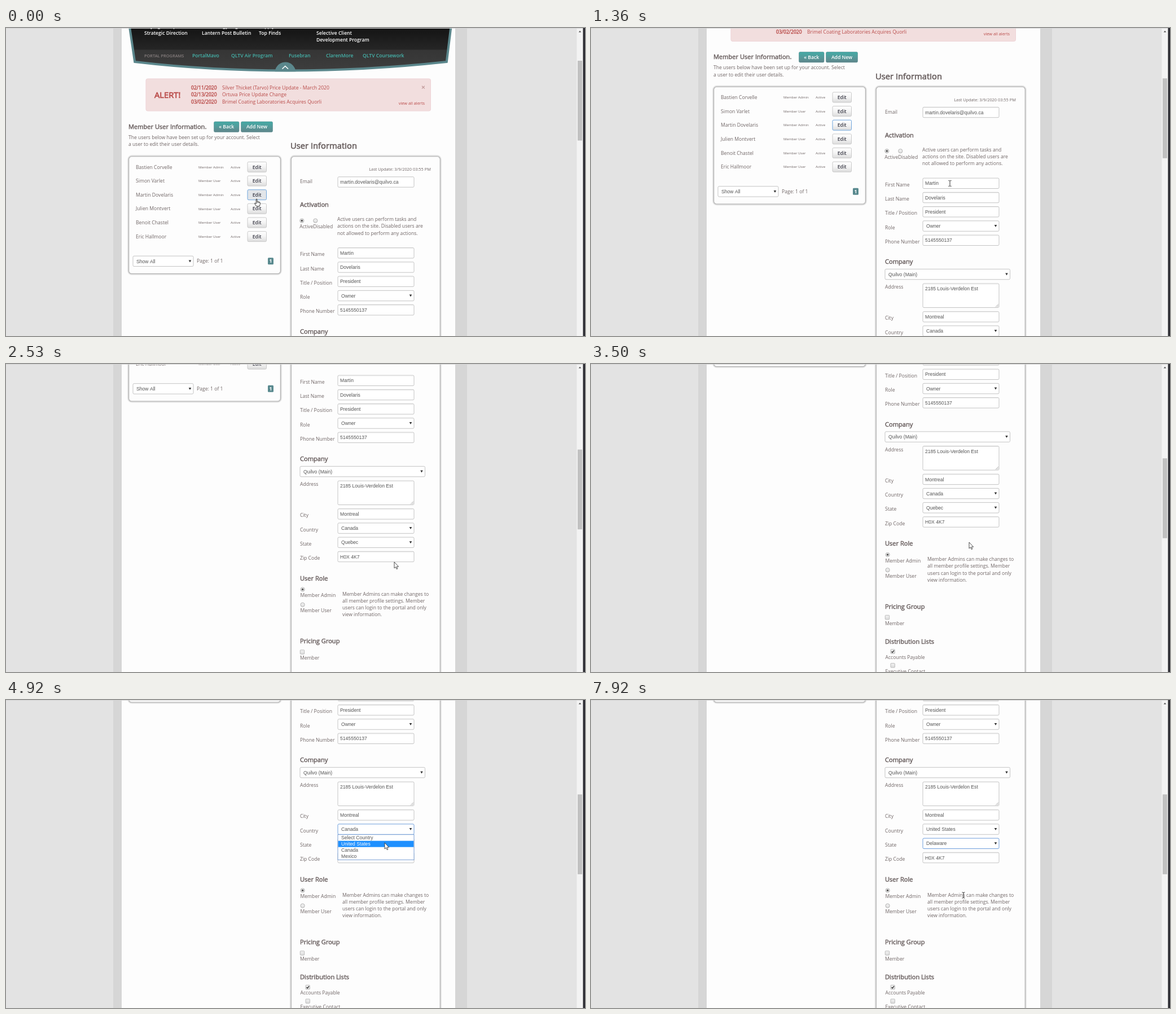
Write an HTML page with a canvas that moves like this. It is 1026 px wide and 546 px high and loops after 8 s.

```html
<!DOCTYPE html>
<html lang="en">
<head>
<meta charset="utf-8">
<title>Member user form</title>
<style>
html, body { margin: 0; width: 100%; height: 100%; overflow: hidden; background: #e3e3e3; }
canvas { display: block; width: 1026px; height: 546px; }
</style>
</head>
<body>
<canvas id="stage"></canvas>
<script>
const W = 1026, H = 546, LOOP = 8000, ZOOM = 0.616, TICK = 61.64;
const INK = '#706666', HEAD = '#685e5e', RED = '#b94a48', TEAL = '#45b5ac';
const SANS = '"Open Sans", sans-serif', ARIAL = '"Liberation Sans", Arial, sans-serif';

const canvas = document.getElementById('stage');
const c = canvas.getContext('2d');
const ratio = window.devicePixelRatio || 1;
canvas.width = W * ratio;
canvas.height = H * ratio;

// pointer path: time, x, y, shape
const path = [
  [0, 444, 303, 'hand'], [150, 540, 275, 'arrow'], [280, 640, 252, 'arrow'], [400, 706, 295, 'arrow'],
  [550, 703, 312, 'beam'], [670, 700, 324, 'beam'], [810, 682, 320, 'arrow'], [940, 662, 315, 'arrow'],
  [1080, 616, 286, 'arrow'], [1210, 575, 267, 'arrow'], [1360, 636, 275.5, 'beam'], [1520, 623, 326.5, 'beam'],
  [1670, 621, 327, 'arrow'], [1950, 645.5, 330.5, 'beam'], [2100, 689.5, 345, 'beam'], [2250, 688, 351, 'arrow'],
  [2660, 638.5, 349.5, 'beam'], [2800, 613, 317, 'arrow'], [2950, 644, 296, 'arrow'], [3080, 670, 279, 'arrow'],
  [3230, 670, 300, 'arrow'], [3360, 670, 314, 'arrow'], [3500, 670, 316, 'arrow'], [3630, 675, 270, 'arrow'],
  [3750, 677, 231, 'arrow'], [3900, 667, 206, 'beam'], [4020, 671, 228, 'arrow'], [4320, 671, 216, 'arrow'],
  [4440, 671, 208, 'arrow'], [4560, 671, 222, 'arrow'], [4680, 671, 243, 'arrow'], [4800, 671, 262, 'arrow'],
  [4920, 671, 253, 'arrow'], [6810, 670, 262, 'arrow'], [6960, 668, 300, 'arrow'], [7080, 660, 343, 'arrow'],
  [7920, 660, 346, 'beam']
];
// wheel ticks: start, duration
const wheel = [[540, 300], [675, 268], [1525, 300], [1575, 300], [2220, 300], [2270, 300], [3221, 360]];
const shots = [1820, 2400, 2530];

const people = [
  ['Bastien Corvelle', 'Member Admin'], ['Simon Varlet', 'Member User'], ['Martin Dovelaris', 'Member Admin'],
  ['Julien Montvert', 'Member User'], ['Benoit Chastel', 'Member User'], ['Eric Hallmoor', 'Member User']
];
const countries = ['Select Country', 'United States', 'Canada', 'Mexico'];
const states = ('Alabama Alaska Arizona Arkansas California Colorado Connecticut Delaware Florida Georgia ' +
  'Hawaii Idaho Illinois Indiana Iowa Kansas Kentucky Louisiana Maine Maryland').split(' ');

function text(s, x, y, { px = 14, color = INK, font = SANS, weight = 400, align = 'left', fake = false } = {}) {
  const size = px * ZOOM;
  c.font = `${weight} ${size}px ${font}`;
  c.textAlign = align;
  c.fillStyle = color;
  c.fillText(s, x, y + size * 0.36);
  if (fake) {
    c.strokeStyle = color;
    c.lineWidth = size / 24;
    c.strokeText(s, x, y + size * 0.36);
  }
}

function lines(rows, x, y, opts) {
  rows.forEach((s, i) => text(s, x, y + i * 12.32, opts));
}

function rect(x, y, w, h, fill) {
  c.fillStyle = fill;
  c.fillRect(x, y, w, h);
}

function box(x, y, w, h, r, fill, stroke, line = 1) {
  c.beginPath();
  c.roundRect(x, y, w, h, r);
  if (fill) { c.fillStyle = fill; c.fill(); }
  if (stroke) { c.strokeStyle = stroke; c.lineWidth = line; c.stroke(); }
}

function shade(y0, y1, ...stops) {
  const g = c.createLinearGradient(0, y0, 0, y1);
  stops.forEach((s, i) => g.addColorStop(i / (stops.length - 1), s));
  return g;
}

function poly(points, fill, stroke, line = 0.8) {
  c.beginPath();
  points.forEach(([x, y]) => c.lineTo(x, y));
  c.closePath();
  c.fillStyle = fill;
  c.fill();
  if (stroke) { c.strokeStyle = stroke; c.lineWidth = line; c.stroke(); }
}

const arial = (s, x, y, color = '#555') => text(s, x, y, { font: ARIAL, color });
const heading = (s, y) => text(s, 521, y, { px: 18, color: HEAD, fake: true });

function field(s, y, x = 588, w = 135, h = 18.4, mid = y) {
  box(x, mid - h / 2, w, h, 2, '#fff', '#c4c4c4');
  rect(x + 1, mid - h / 2 + 0.6, w - 2, 0.8, '#ececec');
  arial(s, x + 4, y);
}

function select(s, y, x = 588, w = 135, focus = false) {
  box(x, y - 9.2, w, 18.4, 2, '#fff', focus ? '#6f9fdc' : '#c4c4c4');
  arial(s, x + 6, y);
  const ax = x + w - 6;
  poly([[ax - 2.3, y - 2], [ax + 2.3, y - 2], [ax, y + 2]], '#333');
}

function radio(x, y, on) {
  box(x - 3.6, y - 3.6, 7.2, 7.2, 3.6, shade(y - 4, y + 4, '#f4f4f4', '#dedede'), '#999', 0.7);
  if (on) box(x - 1.8, y - 1.8, 3.6, 3.6, 1.8, '#555');
}

function check(x, y, on) {
  box(x - 3.7, y - 3.7, 7.4, 7.4, 1, shade(y - 4, y + 4, '#f2f2f2', '#dcdcdc'), '#a5a5a5', 0.7);
  if (!on) return;
  c.beginPath();
  c.moveTo(x - 2.2, y);
  c.lineTo(x - 0.6, y + 1.8);
  c.lineTo(x + 2.4, y - 2);
  c.strokeStyle = '#333';
  c.lineWidth = 1.4;
  c.stroke();
}

function panel(x, y, w, h) {
  box(x - 0.5, y - 0.5, w + 1, h + 1, 6, null, '#e2e2e2', 4);
  box(x, y, w, h, 5, '#fdfdfd', '#a9a9a9', 1.1);
}

function tealButton(s, x, w) {
  box(x, 166, w, 18.4, 2, shade(166, 184, '#43aaa5', '#549b9b', '#5f868b'), '#5a8f92', 0.6);
  text(s, x + w / 2, 175, { weight: 600, color: '#fff', align: 'center' });
}

function header() {
  c.beginPath();
  c.moveTo(213, -40);
  c.lineTo(219.3, 0);
  c.lineTo(228.2, 60);
  c.quadraticCurveTo(494, 91, 780.8, 60);
  c.lineTo(788.2, 0);
  c.lineTo(794, -40);
  c.closePath();
  c.save();
  c.clip();
  rect(205, -40, 600, 79, shade(0, 39, '#141414', '#262626'));
  rect(205, 38.5, 600, 45, shade(38, 78, '#353535', '#3e3e3e'));
  c.restore();
  c.strokeStyle = '#5b878c';
  c.lineWidth = 4;
  c.stroke();
  c.beginPath();
  c.arc(495, 79, 18.5, Math.PI * 1.03, Math.PI * 1.97);
  c.closePath();
  c.fillStyle = '#5b878c';
  c.fill();
  c.beginPath();
  c.moveTo(489.5, 72.5);
  c.lineTo(494.7, 67.5);
  c.lineTo(500, 72.5);
  c.strokeStyle = '#fff';
  c.lineWidth = 1.6;
  c.stroke();

  const nav = { weight: 600, color: '#fff' };
  [['Buying Groups', 245], ['Technology Page', 347], ['Supply List', 448]].forEach(([s, x]) => text(s, x, -3.4, nav));
  [['Strategic Direction', 245], ['Lantern Post Bulletin', 347], ['Top Finds', 448]].forEach(([s, x]) => text(s, x, 9, nav));
  lines(['Selective Client', 'Development Program'], 550, 9, nav);
  text('PORTAL PROGRAMS', 245, 49, { px: 12, weight: 600, color: '#857d7d' });
  [['PortalMavo', 330], ['QLTV Air Program', 399], ['Fusebran', 501], ['ClarenMore', 567], ['QLTV Coursework', 632]]
    .forEach(([s, x]) => text(s, x, 49, { weight: 600, color: TEAL }));
}

function alertBox() {
  box(248, 90, 504.5, 57, 3, '#f2dede', '#eed3d7');
  text('ALERT!', 263, 118.5, { px: 24, color: RED, fake: true });
  lines(['02/11/2020', '02/13/2020', '03/02/2020'], 328, 105.8, { color: RED, fake: true });
  lines(['Silver Thicket (Tarvo) Price Update - March 2020', 'Ortuva Price Update Change',
    'Brimel Coating Laboratories Acquires Quorli'], 383, 105.8, { color: RED });
  text('×', 739.5, 104.8, { px: 18, color: '#c09a9a', align: 'center', fake: true });
  text('view all alerts', 742, 133.5, { px: 12, color: RED, align: 'right' });
}

function userList(t) {
  text('Member User Information.', 217, 175, { px: 18, color: HEAD, fake: true });
  tealButton('« Back', 368.5, 44.5);
  tealButton('Add New', 416.5, 56);
  lines(['The users below have been set up for your account. Select', 'a user to edit their user details.'], 217, 193.7);
  panel(217.6, 227.8, 268.8, 207.7);
  people.forEach(([name, role], i) => {
    const y = 246.4 + i * 24.65, picked = i === 2;
    text(name, 230, y);
    text(role, 341, y, { px: 10 });
    text('Active', 398, y, { px: 10 });
    const fill = picked && t < 150 ? '#e2e5e9' : shade(y - 9, y + 9, '#fff', '#f4f4f4', '#dcdcdc');
    box(428, y - 9, 33.5, 18, 2, fill, picked ? '#6fa5dd' : '#cacaca');
    text('Edit', 444.7, y, { weight: 600, color: '#3c3c48', align: 'center' });
  });
  select('Show All', 413.4, 225, 107);
  text('Page: 1 of 1', 338, 413);
  box(464, 407.3, 10, 12, 1.5, '#5a8a8f');
  text('1', 469, 413.3, { weight: 700, color: '#fff', align: 'center' });
}

function form(t) {
  text('User Information', 504, 208.9, { px: 24, color: HEAD, fake: true });
  panel(505.3, 227.8, 264, 1000);
  text('Last Update: 3/9/2020 03:55 PM', 752.8, 250.6, { px: 12, align: 'right' });
  text('Email', 521, 272.2);
  field('martin.dovelaris@quilvo.ca', 273);
  heading('Activation', 313.5);
  radio(524.3, 341.6, true);
  radio(548.3, 341.6);
  text('Active', 520.3, 352);
  text('Disabled', 544.3, 352);
  lines(['Active users can perform tasks and', 'actions on the site. Disabled users are',
    'not allowed to perform any actions.'], 587, 339);

  const rowY = i => 398.8 + i * 25.25;
  ['First Name', 'Last Name', 'Title / Position', 'Role', 'Phone Number'].forEach((s, i) => text(s, 521, rowY(i) + 2.5));
  field('Martin', rowY(0));
  field('Dovelaris', rowY(1));
  field('President', rowY(2));
  select('Owner', rowY(3));
  field('5145550137', rowY(4));

  heading('Company', 537.8);
  select('Quilvo (Main)', 560.1, 521, 221.5);
  text('Address', 521, 582.4);
  field('2185 Louis-Verdelon Est', 585.6, 588, 135, 42.5, 597.8);
  c.beginPath();
  for (const d of [2.5, 5]) {
    c.moveTo(722 - d, 618);
    c.lineTo(722, 618 - d);
  }
  c.strokeStyle = '#888';
  c.lineWidth = 0.7;
  c.stroke();

  const lowY = i => 635.4 + i * 25.2;
  ['City', 'Country', 'State', 'Zip Code'].forEach((s, i) => text(s, 521, lowY(i) + 2.4));
  field('Montreal', lowY(0));
  select(t < 5660 ? 'Canada' : 'United States', lowY(1), 588, 135, t >= 4170 && t < 6260);
  select(t < 5660 ? 'Quebec' : t < 7920 ? 'Alabama' : 'Delaware', lowY(2), 588, 135, t >= 6260);
  field('H0X 4K7', lowY(3));

  heading('User Role', 749.2);
  radio(525.6, 769, true);
  text('Member Admin', 521.5, 779.6);
  radio(525.6, 796.2);
  text('Member User', 521.5, 806.6);
  lines(['Member Admins can make changes to', 'all member profile settings. Member',
    'users can login to the portal and only', 'view information.'], 596, 776.9);
  heading('Pricing Group', 860.6);
  check(525, 880.1, false);
  text('Member', 521, 890.6);
  heading('Distribution Lists', 923);
  check(534.7, 940.6, true);
  text('Accounts Payable', 521.5, 950.8);
  check(534.7, 965.3, false);
  text('Executive Contact', 521.5, 975.4);
}

function popup(items, top, first, from, t, bar) {
  const row = 11.05, h = items.length * row;
  let hot = first;
  for (const [at, , y] of path) {
    const i = Math.floor((y - top) / row);
    if (at > from && at <= t && i >= 0 && i < items.length) hot = i;
  }
  rect(588, top, 135, h + 0.5, '#fff');
  items.forEach((s, i) => {
    const y = top + i * row;
    if (i === hot) rect(588.5, y, 134, row, '#1e90ff');
    arial(s, 594, y + row / 2, i === hot ? '#fff' : '#555');
  });
  if (bar) {
    rect(712, top, 11, h, '#f1f1f1');
    rect(713, top + 11, 9, 74, '#c1c1c1');
    poly([[715, top + 7], [720, top + 7], [717.5, top + 4]], '#555');
    poly([[715, top + h - 7], [720, top + h - 7], [717.5, top + h - 4]], '#555');
  }
  c.strokeStyle = '#7b9fd4';
  c.lineWidth = 1;
  c.strokeRect(588, top, 135, h + 0.5);
}

const pointers = {
  arrow() {
    poly([[0, 0], [0, 11], [2.5, 8.8], [4.2, 12.6], [5.9, 11.9], [4.2, 8.2], [7.6, 8.2]], '#fff', '#222');
  },
  beam() {
    c.beginPath();
    for (const s of [-1, 1]) {
      c.moveTo(-2.5, 5 * s);
      c.lineTo(-0.8, 5 * s);
      c.lineTo(0, 4 * s);
      c.lineTo(0.8, 5 * s);
      c.lineTo(2.5, 5 * s);
    }
    c.moveTo(0, -4);
    c.lineTo(0, 4);
    c.strokeStyle = '#333';
    c.lineWidth = 1;
    c.stroke();
  },
  hand() {
    poly([[-0.8, 0.8], [0, 0], [1, 0.8], [1, 5], [3, 4.9], [5, 5.6], [6.3, 6.5], [6.3, 9.5], [5, 13], [-0.3, 13],
      [-3.4, 8.4], [-3, 7.2], [-0.8, 8.6]], '#fff', '#222', 0.9);
    c.beginPath();
    for (const x of [1, 2.9, 4.7]) {
      c.moveTo(x, 5);
      c.lineTo(x, 7.5);
    }
    c.lineWidth = 0.6;
    c.stroke();
  }
};

function scrollAt(t) {
  const sum = wheel.reduce((s, [start, len]) => {
    const p = Math.min(1, Math.max(0, (t - start) / len));
    return s + TICK * (1 - (1 - p) ** 3);
  }, 0);
  return Math.round(sum * 2) / 2;
}

function frame(t) {
  const [at, x, y, shape] = path.findLast(p => p[0] <= t);
  const shown = Math.max(at, ...shots.filter(s => s <= t));
  const scroll = scrollAt(shown);

  c.setTransform(ratio, 0, 0, ratio, 0, 0);
  rect(0, 0, W, H, '#e3e3e3');
  rect(190, 0, 627, H, '#d6d6d6');
  rect(205, 0, 591, H, '#fdfdfd');

  c.save();
  c.translate(0, -scroll);
  header();
  alertBox();
  userList(t);
  form(t);
  c.restore();

  if (t >= 4170 && t < 5660) popup(countries, 238.6, 2, 4170, t, false);
  if (t >= 6260 && t < 7920) popup(states, 263.8, 0, 6260, t, true);

  rect(1011.5, 0, 10.5, H, '#f3f3f3');
  rect(1013, 58 + scroll * 0.2535, 8, 141.5, '#c1c1c1');
  poly([[1014.7, 7.5], [1019.3, 7.5], [1017, 4.8]], '#505050');
  rect(1022.5, 0, 3.5, H, '#2d2d33');
  rect(0, 0, 1022, 1, '#d4d4d4');

  c.save();
  c.translate(x, y);
  pointers[shape]();
  c.restore();
}

const began = performance.now();
function run() {
  frame((performance.now() - began) % LOOP);
  requestAnimationFrame(run);
}
run();
</script>
</body>
</html>
```
